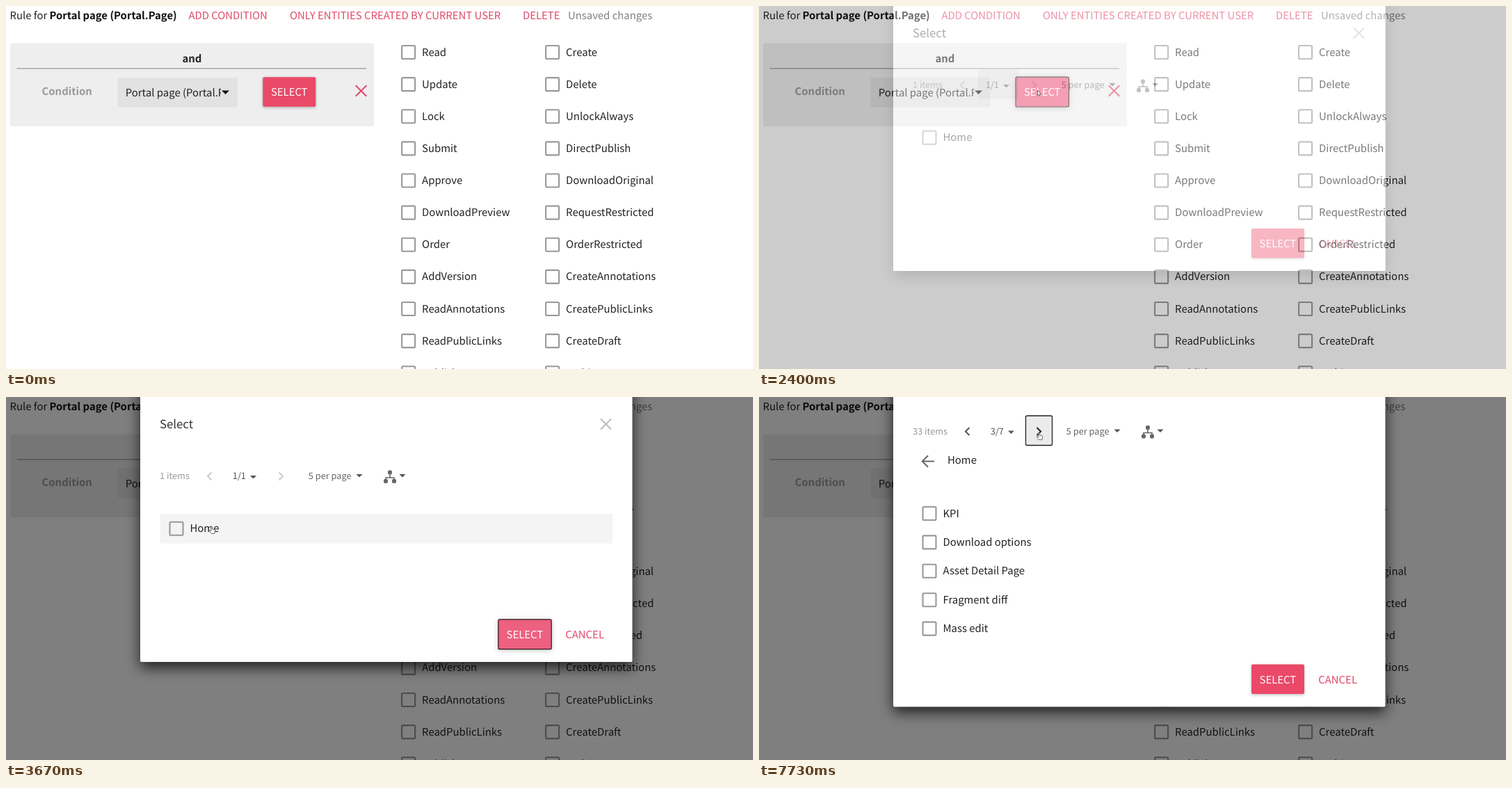
An HTML page with a canvas for the animation above (8 s loop, 1074x522 px).

```html
<!DOCTYPE html>
<html lang="en">
<head>
<meta charset="utf-8">
<title>Select a portal page</title>
<style>
  html, body { margin: 0; width: 100%; height: 100%; overflow: hidden; background: #fff; }
  canvas { display: block; }
</style>
</head>
<body>
<canvas id="stage" width="1074" height="522"></canvas>
<script>
const ctx = document.getElementById('stage').getContext('2d');
const LOOP = 8000, TICK = 1000 / 15;
const FAMILY = '"Noto Sans CJK SC", "Noto Sans CJK JP", "Noto Sans CJK KR", "Noto Sans", sans-serif';
const BODY = 14.9, SMALL = 12.75, TITLE = 16.8;
const PINK = '#ea4968', PINK_HOVER = '#ed6080', LINK = '#e0486a', INK = '#222', GREY = '#999';

const PERMISSIONS = [
  ['Read', 'Create'], ['Update', 'Delete'], ['Lock', 'UnlockAlways'], ['Submit', 'DirectPublish'],
  ['Approve', 'DownloadOriginal'], ['DownloadPreview', 'RequestRestricted'], ['Order', 'OrderRestricted'],
  ['AddVersion', 'CreateAnnotations'], ['ReadAnnotations', 'CreatePublicLinks'],
  ['ReadPublicLinks', 'CreateDraft'], ['Publish', 'Archive'],
];
const PAGES = [
  ['Saved search detail', 'New comment', "What's new", 'Reports', 'Fragment Detail'],
  ['Search page', 'Collections', 'Content detail', 'Settings', 'Upload page'],
  ['KPI', 'Download options', 'Asset Detail Page', 'Fragment diff', 'Mass edit'],
];

function text(str, x, y, color = INK, size = BODY, weight = 400) {
  ctx.font = `${weight} ${size}px ${FAMILY}`;
  ctx.fillStyle = color;
  ctx.fillText(str, x, y);
}

function box(x, y, w, h, color, radius = 0) {
  ctx.fillStyle = color;
  ctx.beginPath();
  ctx.roundRect(x, y, w, h, radius);
  ctx.fill();
}

function frame(x, y, w, h, color, width, radius = 1.5) {
  ctx.strokeStyle = color;
  ctx.lineWidth = width;
  ctx.beginPath();
  ctx.roundRect(x, y, w, h, radius);
  ctx.stroke();
}

function line(color, width, ...points) {
  ctx.strokeStyle = color;
  ctx.lineWidth = width;
  ctx.beginPath();
  points.forEach(([x, y]) => ctx.lineTo(x, y));
  ctx.stroke();
}

function withShadow(color, blur, offset, draw) {
  ctx.save();
  Object.assign(ctx, { shadowColor: color, shadowBlur: blur, shadowOffsetY: offset });
  draw();
  ctx.restore();
}

function clipped(x, y, w, h, draw) {
  ctx.save();
  ctx.beginPath();
  ctx.rect(x, y, w, h);
  ctx.clip();
  draw();
  ctx.restore();
}

function cross(x, y, r, color) {
  line(color, 2, [x - r, y - r], [x + r, y + r]);
  line(color, 2, [x + r, y - r], [x - r, y + r]);
}

function caret(x, y, w, color) {
  ctx.fillStyle = color;
  ctx.beginPath();
  ctx.moveTo(x, y);
  ctx.lineTo(x + w, y);
  ctx.lineTo(x + w / 2, y + w / 2);
  ctx.fill();
}

function chevron(x, y, dir, color) {
  line(color, 2, [x - 3 * dir, y - 5.5], [x + 2.6 * dir, y], [x - 3 * dir, y + 5.5]);
}

function checkbox(x, y, label) {
  frame(x - 9.5, y - 9.5, 19, 19, GREY, 2.1);
  text(label, x + 19.5, y + 5);
}

function button(x, y, hover, focus) {
  withShadow('rgba(0,0,0,.25)', focus ? 8 : 4, 1.5, () =>
    box(x, y, 76, 42.5, hover ? PINK_HOVER : PINK, 2));
  if (focus) frame(x - .2, y - .2, 76.4, 42.9, '#2a1218', 1.2, 2);
  text('SELECT', x + 11.6, y + 27, '#fff');
}

function drawPage(hover, focus) {
  box(0, 0, 1074, 522, '#fff');
  text('Rule for', 5.5, 19);
  text('Portal page (Portal.Page)', 62.4, 19, '#111', BODY, 700);
  text('ADD CONDITION', 262.4, 19, LINK);
  text('ONLY ENTITIES CREATED BY CURRENT USER', 408, 19, LINK);
  text('DELETE', 743, 19, LINK);
  text('Unsaved changes', 808, 19, '#808080');

  box(6, 53.5, 523, 119.5, '#eee', 2);
  text('and', 253.5, 81, INK, BODY, 700);
  line(GREY, 1.2, [15.5, 89.8], [518, 89.8]);
  text('Condition', 51.5, 127.5, GREY, BODY, 700);
  box(160.5, 103, 172.5, 42.5, '#e2e2e2', 2);
  clipped(160, 103, 149, 43, () => text('Portal page (Portal.Page)', 171.8, 130));
  caret(310, 121.5, 11, '#111');
  button(369.3, 102.3, hover, focus);
  cross(510.5, 122, 7.8, LINK);

  PERMISSIONS.forEach((pair, row) => pair.forEach((label, col) =>
    checkbox(578.6 + col * 207, 66.5 + row * 46.13, label)));
}

function drawToolbar(y, dx, total, page, pages, nextFocus) {
  text(`${total} items`, 221, y + 4.7, GREY, SMALL);
  chevron(292.5 + dx, y + .5, -1, page > 1 ? '#555' : '#ccc');
  text(`${page}/${pages}`, 325.8 + dx, y + 4.7, '#555', SMALL);
  caret(351 + dx, y - .5, 9, '#555');
  if (nextFocus) {
    box(383.5, y - 22, 38, 42.5, '#ebebeb', 2);
    frame(383.5, y - 22, 38, 42.5, '#222', 1.3, 2);
  }
  chevron(395.5 + dx, y + .5, 1, page < pages ? (nextFocus ? '#222' : '#555') : '#ccc');
  text('5 per page', 434.8 + dx, y + 4.7, '#666', SMALL);
  caret(503.5 + dx, y - 2.5, 9, '#555');

  const x = 552 + dx;
  box(x - 3, y - 8, 6, 6, '#666', 2);
  line('#666', 1.6, [x, y - 2], [x, y + 2.5]);
  line('#666', 1.6, [x - 6, y + 5], [x - 6, y + 2.5], [x + 6, y + 2.5], [x + 6, y + 5]);
  for (const side of [-6, 6]) box(x + side - 3, y + 4.5, 6, 6, '#666', 2);
  caret(565.5 + dx, y - 2.5, 9, '#555');
}

function drawDialog(t, alpha) {
  const opening = alpha < 1;
  const nested = t >= 4600, expanded = t >= 5270;
  const grow = expanded ? 64.5 : 0;
  const page = t >= 7400 ? 3 : t >= 6930 ? 2 : 1;
  const list = t >= 7730 ? 2 : t >= 7070 ? 1 : 0;

  box(0, 0, 1074, 522, `rgba(0,0,0,${alpha / 2})`);
  withShadow(`rgba(0,0,0,${.75 * alpha ** 2})`, 20, 8, () => box(193, -60, 707.5, 441 + grow, '#fff', 2));
  text('Select', 221, 45 - grow, '#333', TITLE);
  cross(862.5, 39 - grow, 7.5, '#bbb');

  if (opening) box(314, 91.5, 59, 42.5, '#eee', 2);
  drawToolbar(113.5 - grow, expanded ? 7 : 0, expanded ? 33 : 1, page, expanded ? 7 : 1, t >= 6800);

  if (nested) {
    const y = 157 - grow;
    line('#666', 2, [252, y], [235, y]);
    line('#666', 2, [243, y - 8.3], [234.7, y], [243, y + 8.3]);
    text('Home', 271, y + 3);
  } else if (t >= 3300) {
    box(221.5, 168, 650.5, 42.5, '#f4f4f4');
  }
  const rows = expanded ? PAGES[list] : ['Home'];
  const top = nested ? 232 - grow : 189.3;
  rows.forEach((label, i) => checkbox(245, top + i * 41.4, label));

  const focused = !opening && t < 4530;
  button(708, 320 + grow, focused, focused);
  text('CANCEL', 804.3, 347 + grow, LINK);

  if (t >= 4200 && t < 4530) {
    box(298.5, 205.5, 84, 29, '#fff');
    frame(298.5, 205.5, 84, 29, '#777', 1, 0);
    text('Home page', 308, 225, '#555', 12.5);
  }
}

// Keys: [time, x, y]
function along(keys, t, ease = u => u) {
  let i = 0;
  while (i < keys.length - 2 && t >= keys[i + 1][0]) i++;
  const [t0, x0, y0] = keys[i], [t1, x1, y1] = keys[i + 1];
  const u = ease(Math.min(1, Math.max(0, (t - t0) / (t1 - t0))));
  return [x0 + (x1 - x0) * u, y0 + (y1 - y0) * u];
}

const easeOut = u => 1 - (1 - u) ** 2;

function pointerAt(t) {
  t = Math.floor(t / TICK + .05) * TICK;
  if (t < 3000) return along([[1125, 410, 5], [1730, 400.5, 121]], t, easeOut);
  if (t < 5900) return along([[3060, 400.5, 121], [3865, 288, 190]], t, easeOut);
  return along([[5920, 287, 190], [6065, 302, 108], [6330, 365, 58], [6530, 408, 47], [6730, 402, 51]], t);
}

function drawPointer(x, y, hand) {
  const path = new Path2D(hand
    ? 'M0 .8Q.8-.4 1.6.8V4L5 4.8Q6 5.2 5.8 6.5L5 10.5H.6L-2.6 6.6Q-2.6 5.2-1.2 5.8L0 7Z'
    : 'M0 0V7.8L1.7 6.3 2.8 8.6 3.9 8 2.9 5.9H5Z');
  ctx.save();
  ctx.translate(x, y);
  ctx.fillStyle = '#fff';
  ctx.fill(path);
  ctx.strokeStyle = '#555';
  ctx.lineWidth = .9;
  ctx.stroke(path);
  ctx.restore();
}

function render(t) {
  const [x, y] = pointerAt(t);
  const overSelect = t < 2400 && y > 102;
  const page = () => drawPage(overSelect || t >= 2130, t >= 2130);
  page();
  if (t >= 2400) {
    const alpha = t < 2470 ? .4 : t < 2530 ? .8 : 1;
    drawDialog(t, alpha);
    // While opening, the undimmed page still shows through the dialog.
    if (alpha < 1) clipped(193, 0, 707.5, 381, () => {
      ctx.globalAlpha = 1 - alpha;
      drawFlattened(page);
    });
  }
  const hand = overSelect || (t >= 3300 && t < 5530) || t >= 6470;
  if (t >= 1130) drawPointer(x, y, hand);
}

// Draws a layer as one image, so the current alpha applies to it as a whole.
const layer = new OffscreenCanvas(1074, 522);
function drawFlattened(draw) {
  const alpha = ctx.globalAlpha;
  const below = layer.getContext('2d');
  below.drawImage(ctx.canvas, 0, 0);
  ctx.globalAlpha = 1;
  draw();
  ctx.globalAlpha = 1 - alpha;
  ctx.drawImage(layer, 0, 0);
}

ctx.textRendering = 'geometricPrecision';
function tick() {
  render(performance.now() % LOOP);
  requestAnimationFrame(tick);
}
tick();
</script>
</body>
</html>
```
